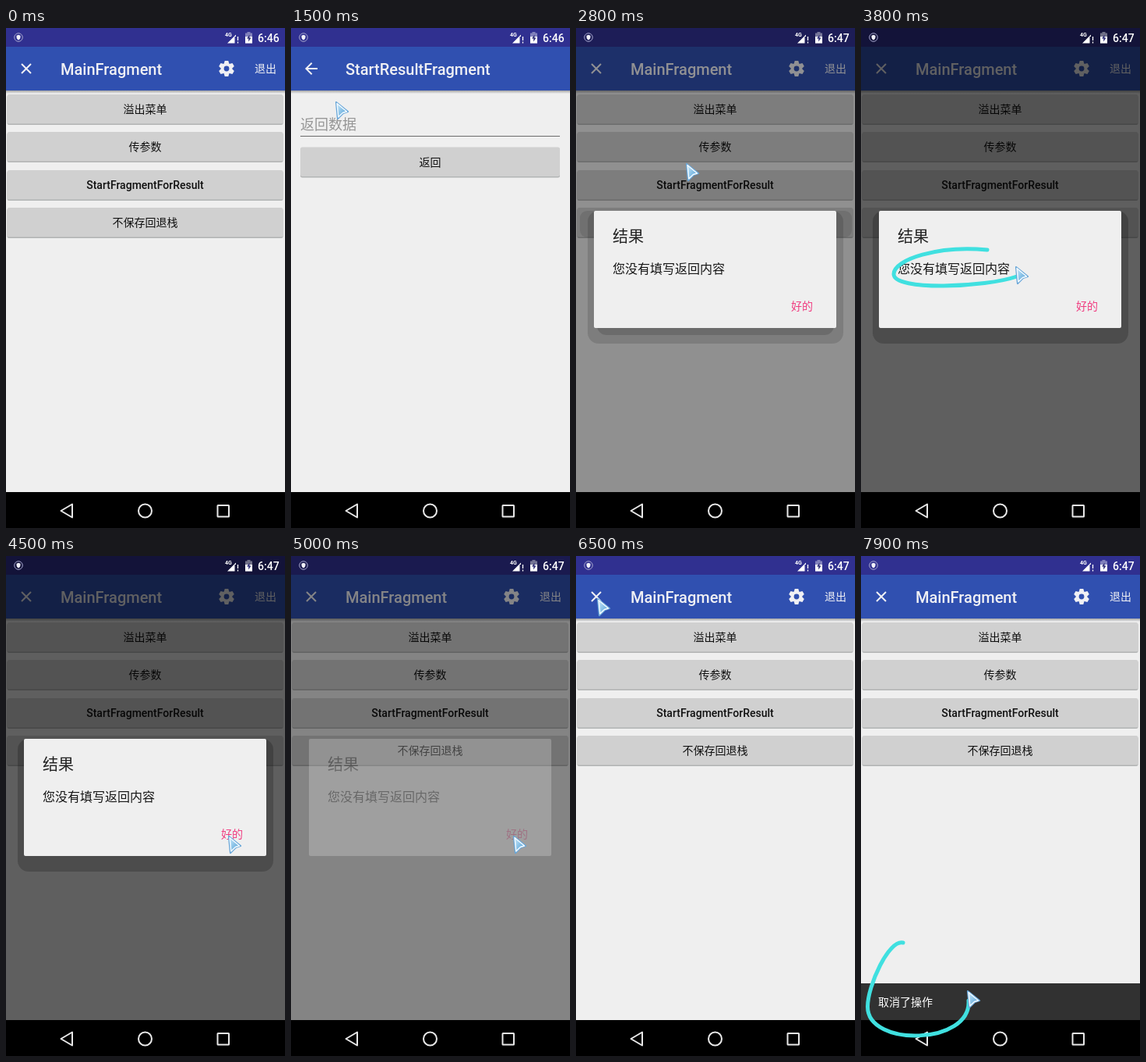
An HTML page for the animation above (8 s loop, 358 by 640 pixels).

```html
<!DOCTYPE html>
<html lang="zh-CN">
<head>
<meta charset="utf-8">
<title>Fragment demo</title>
<style>
html, body { margin: 0; width: 100%; height: 100%; overflow: hidden; background: #000; }
svg { display: block; width: 358px; height: 640px; }
text { font: 14px Roboto, "Noto Sans CJK SC", "Noto Sans CJK", sans-serif; }
.mid { text-anchor: middle; font-weight: 500; fill: #111; }
.title { font-size: 20px; font-weight: 500; fill: #f0f0f4; }
.pen { fill: none; stroke: #40e0e0; stroke-width: 5; stroke-linecap: round; stroke-linejoin: round; }
</style>
</head>
<body>
<svg viewBox="0 0 358 640">
  <defs>
    <linearGradient id="drop" x2="0" y2="1">
      <stop stop-color="#a4a4a4"/><stop offset="1" stop-color="#efefef"/>
    </linearGradient>
    <linearGradient id="ice" x2="1" y2="1">
      <stop stop-color="#c8e8fa"/><stop offset="1" stop-color="#4c9cd4"/>
    </linearGradient>
    <clipPath id="app"><rect width="358" height="594"/></clipPath>
  </defs>

  <rect width="358" height="594" fill="#efefef"/>
  <rect y="80" width="358" height="4" fill="url(#drop)"/>
  <rect width="358" height="24" fill="#303090"/>
  <rect y="24" width="358" height="56" fill="#3050b0"/>

  <g id="main">
    <path d="M20 46l12 12M32 46l-12 12" stroke="#f0f0f4" stroke-width="2"/>
    <text class="title" x="70" y="60">MainFragment</text>
    <g id="gear" transform="translate(283 52)" fill="#f0f0f4">
      <circle r="5.3" fill="none" stroke="#f0f0f4" stroke-width="3.8"/>
    </g>
    <text x="319" y="57" fill="#f0f0f4">退出</text>
    <rect id="press" x="3" y="220" width="351" height="4" rx="2" fill="#bdbdbd"/>
    <g id="list"></g>
  </g>

  <g id="form">
    <path d="M34 51H21.8l5.6-5.6L26 44l-8 8 8 8 1.4-1.4L21.8 53H34z" fill="#f0f0f4"/>
    <text class="title" x="70" y="60">StartResultFragment</text>
    <text x="12" y="130" style="font-size:18px" fill="#969696">返回数据</text>
    <rect x="12" y="138" width="333" height="1" fill="#6c6c6c"/>
    <g id="back"></g>
  </g>

  <rect id="dim" width="358" height="594"/>
  <g id="shade">
    <rect id="outer" x="15" y="234" width="328" height="170" rx="14"/>
    <g id="halo">
      <rect x="5" y="234" width="349" height="34" rx="9" opacity=".1"/>
      <rect x="27" y="234" width="304" height="159" rx="12" opacity=".14"/>
    </g>
  </g>
  <g id="dialog">
    <rect x="23" y="234" width="311" height="150" rx="2" fill="#efefef"/>
    <text x="47" y="274" style="font-size:20px" fill="#212121">结果</text>
    <text x="47" y="314" style="font-size:16px" fill="#181818">您没有填写返回内容</text>
    <text x="276" y="361" fill="#f03c80">好的</text>
  </g>

  <g clip-path="url(#app)">
    <g id="snack">
      <rect y="547" width="358" height="48" fill="#313131"/>
      <text x="22" y="576" fill="#fff">取消了操作</text>
    </g>
  </g>

  <g id="status">
    <circle cx="16" cy="12" r="5.3" fill="none" stroke="#a4a4cc"/>
    <path d="M13.5 9.8l2.5-1 2.5 1v2.2q0 2.4-2.5 3.4q-2.5-1-2.5-3.4z" fill="#f0f0f8"/>
    <text x="281" y="11" style="font-size:7px;font-weight:700" fill="#fff">4G</text>
    <path d="M284 19.5L295 8.5V11H293.5V19.5z" fill="#fff"/>
    <path d="M297.5 11v5M297.5 17.5v2" stroke="#fff" stroke-width="1.3"/>
    <path d="M309.5 5h4v1.5h2.5v13h-9v-13h2.5z" fill="#fff" opacity=".4"/>
    <path d="M307 11h9v8.5h-9z" fill="#fff"/>
    <path d="M312.5 8.5l-3.5 5h2.2v4l3.3-5h-2z" fill="#303078"/>
    <text id="clock" x="323" y="18" style="font-weight:500" fill="#fff"></text>
  </g>

  <rect y="594" width="358" height="46"/>
  <g fill="none" stroke="#e8e8e8" stroke-width="2">
    <path d="M85 609.5v17L70.5 618z" stroke-linejoin="round"/>
    <circle cx="178.5" cy="618" r="8.5"/>
    <rect x="271.5" y="611" width="14.5" height="14.5" rx=".5"/>
  </g>

  <g id="ink"></g>
  <g id="cursor" stroke-linejoin="round">
    <path d="M0 0L15 12L9 14L2 21z" fill="none" stroke="#68a6d8" stroke-width="2.2"/>
    <path d="M1 1.5L13.5 12L8.500 13.500L2.800 19z" fill="url(#ice)" stroke="#f4fbff" stroke-width="1.5"/>
  </g>
</svg>
<script>
const LOOP = 8000, STEP = 100, HOLD = 400;
const $ = id => document.getElementById(id);
const show = (el, on) => el.style.display = on ? "" : "none";
const within = (t, a, b) => t >= a && t < b;
const ramp = (t, a, b) => Math.min(1, Math.max(0, (t - a) / (b - a)));

function add(parent, tag, attrs, text) {
  const el = document.createElementNS("http://www.w3.org/2000/svg", tag);
  for (const k in attrs) el.setAttribute(k, attrs[k]);
  if (text) el.textContent = text;
  return parent.appendChild(el);
}

function button(parent, x, y, label) {
  const width = 357 - 2 * x;
  add(parent, "rect", { x, y: y + 1, width, height: 38, rx: 2.5, fill: "#b2b4b4" });
  add(parent, "rect", { x, y, width, height: 37.5, rx: 2.5, fill: "#d0d0d0" });
  add(parent, "text", { class: "mid", x: 178.5, y: y + 24 }, label);
}

["溢出菜单", "传参数", "StartFragmentForResult", "不保存回退栈"]
  .forEach((label, i) => button($("list"), 1.5, Math.round(85 + i * 48.4), label));
button($("back"), 12, 152.5, "返回");

for (let a = 0; a < 360; a += 60)
  add($("gear"), "path", { d: "M-3.4-6L-2.3-10H2.3L3.4-6z", transform: `rotate(${a})` });

// a glide moves the cursor to a point, a loop draws along a curve
const glide = (start, end, x, y) => ({ start, end, at: (k, from) =>
  [from[0] + (x - from[0]) * k, from[1] + (y - from[1]) * k] });

function loop(start, end, d) {
  const el = add($("ink"), "path", { class: "pen", d }), len = el.getTotalLength();
  return {
    start, end,
    at(k) {
      const p = el.getPointAtLength(len * k);
      return [p.x - 1, p.y - 1 - 11 * k];
    },
    paint(t) {
      const k = ramp(t, start, end);
      show(el, k > 0 && t < end + HOLD);
      el.style.strokeDasharray = `${len * k} ${len + 10}`;
    }
  };
}

const route = [
  glide(100, 400, 275, 208),
  glide(1100, 1300, 192, 135),
  glide(1400, 1500, 58, 95),
  loop(1500, 1900, "M59 96C25 92 3 110 3 124C3 156 95 158 100 128"),
  glide(1900, 2400, 142, 174),
  glide(2900, 3600, 161, 283),
  loop(3600, 3800, "M162 284C100 278 42 296 42 315C42 337 160 332 200 318"),
  glide(3800, 4500, 286, 359),
  glide(5100, 5600, 275, 200),
  glide(5900, 6400, 28, 55),
  glide(6800, 7600, 53, 494),
  loop(7600, 7900, "M54 495C36 490 8.500 550 8.500 577C8.500 629 142 626 138 569")
];

function drawCursor(t) {
  let pos = [316, 270];
  for (const leg of route) {
    if (leg.paint) leg.paint(t);
    if (t >= leg.start) pos = leg.at(ramp(t, leg.start, leg.end), pos);
  }
  show($("cursor"), t >= 100);
  $("cursor").setAttribute("transform", `translate(${pos})`);
}

function drawDialog(t) {
  const open = t < 2800 ? 0 : ramp(t, 2600, 2900);
  const close = ramp(t, 4800, 5200);
  const dim = .6 * open * (1 - close ** 2);
  $("dim").style.opacity = dim;
  $("outer").style.opacity = dim / 3;
  $("dialog").style.opacity = t < 2800 ? 0 : (1 - close) ** 2;
  show($("shade"), within(t, 2800, 4900));
  show($("halo"), open < 1);
}

function draw(t) {
  const form = within(t, 1000, 2500) || within(t, 5900, 6500);
  show($("main"), !form);
  show($("form"), form);
  show($("press"), within(t, 700, 1000) || within(t, 5600, 5900));
  $("clock").textContent = t < 2000 ? "6:46" : "6:47";
  const down = 48 * (1 - ramp(t, 6700, 7100)) ** 2;
  $("snack").setAttribute("transform", `translate(0 ${down})`);
  drawDialog(t);
  drawCursor(t);
}

function tick() {
  draw(Math.floor(performance.now() % LOOP / STEP) * STEP);
  requestAnimationFrame(tick);
}
tick();
</script>
</body>
</html>
```
